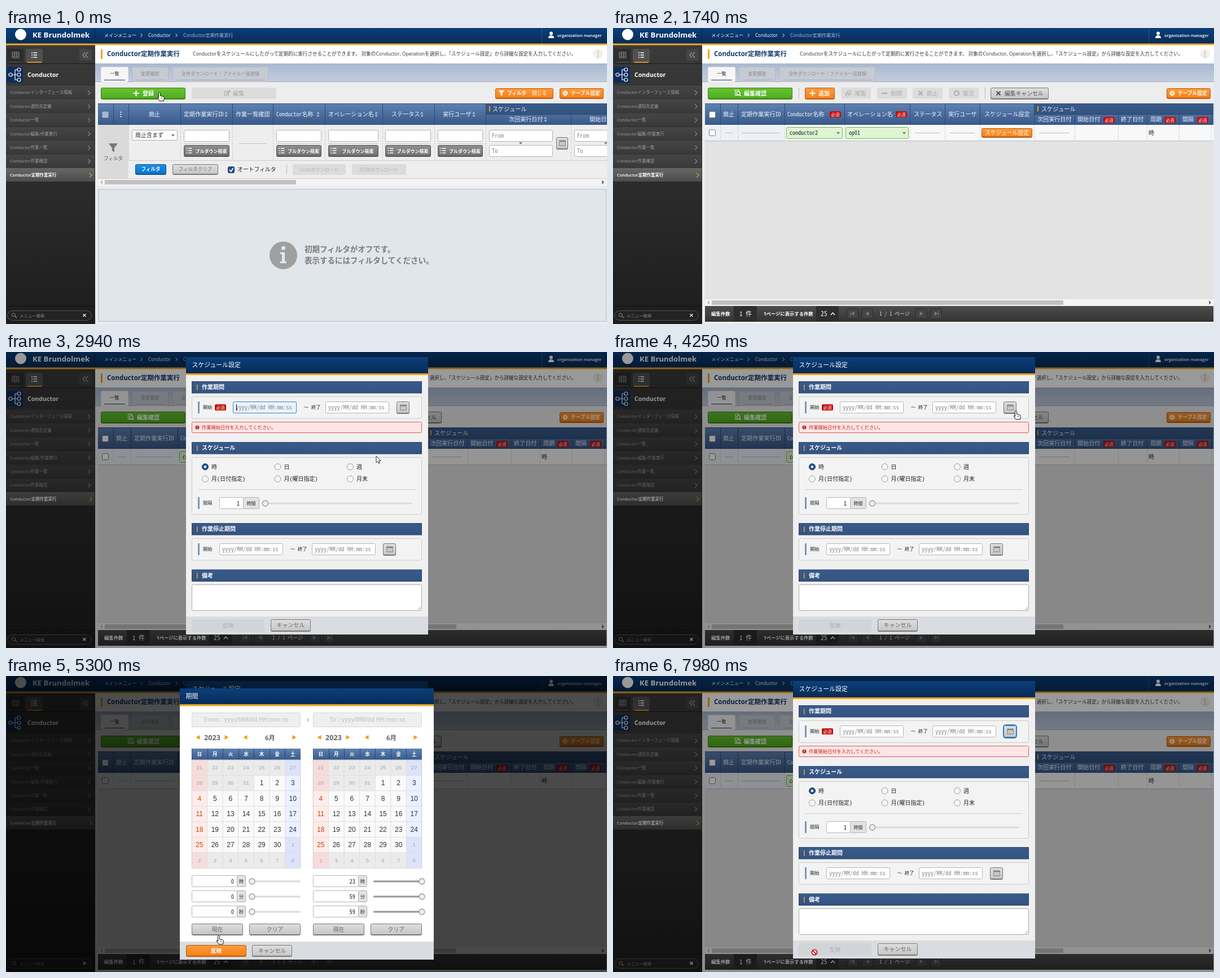
These frames come from a looping animation (1065 px wide and 526 px high, 8000 ms). An HTML page:

```html
<!DOCTYPE html>
<html lang="ja">
<head>
<meta charset="utf-8">
<title>Schedule settings</title>
<style>
html,body{margin:0;width:100%;height:100%;overflow:hidden;background:#ededed}
svg{display:block;width:100vw;height:100vh}
text{font-family:"Open Sans","Noto Sans CJK JP",sans-serif;white-space:pre}
.m{font-family:"Noto Sans Mono CJK JP","Noto Sans CJK JP",monospace}
.a{font-family:"Liberation Sans",Arial,sans-serif}
.b{font-weight:700}
.s{font-weight:600}
.c{text-anchor:middle}
.e{text-anchor:end}
#cursor{animation:move 8s ease-in-out infinite}
@keyframes move{
0%,16.25%{transform:translate(272px,114px)}
21.75%{transform:translate(675px,149px)}
26.4%,32.5%{transform:translate(690px,184px)}
36.75%,39.4%{transform:translate(656px,185px)}
46.5%,55.6%{transform:translate(714px,104px);animation-timing-function:ease-in}
62.1%{transform:translate(453px,341px);animation-timing-function:ease-out}
66.25%,73.75%{transform:translate(377px,461px)}
79.5%,86.25%{transform:translate(576px,457px)}
91.25%{transform:translate(430px,498px)}
94.6%,100%{transform:translate(357px,491px)}
}
</style>
</head>
<body>
<svg id="stage" viewBox="0 0 1065 526" preserveAspectRatio="none"></svg>
<script>
const LOOP = 8000;
let css = '', count = 0;

// Drawing helpers
const R = (x, y, w, h, fill, stroke, r = 0) => {
  const i = stroke ? .5 : 0;
  return `<rect x="${x + i}" y="${y + i}" width="${w - 2 * i}" height="${h - 2 * i}" rx="${r}" fill="${fill}" ${stroke ? `stroke="${stroke}"` : ''}/>`;
};
const C = (x, y, r, fill, stroke = 'none', w = 1) =>
  `<circle cx="${x}" cy="${y}" r="${r}" fill="${fill}" stroke="${stroke}" stroke-width="${w}"/>`;
const P = (d, stroke, w = 1, fill = 'none', extra = '') =>
  `<path d="${d}" stroke="${stroke}" stroke-width="${w}" fill="${fill}" ${extra}/>`;
const T = (x, y, s, size, fill, cls = '') =>
  `<text x="${x}" y="${y}" font-size="${size}" fill="${fill}" class="${cls}">${s}</text>`;
const each = (list, f) => list.map(f).join('');
const V = (x, y1, y2, color, dash) => P(`M${x + .5} ${y1}V${y2}`, color, 1, 'none', dash ? 'stroke-dasharray="2 2"' : '');
const H = (y, x1, x2, color) => P(`M${x1} ${y + .5}H${x2}`, color);

// Visible from a to b (ms), optionally fading in
const show = (a, b, html, fade = 0) => {
  const name = 'k' + count++, p = t => t / LOOP * 100;
  css += `@keyframes ${name}{` +
    (a ? `0%,${p(a) - .01}%{opacity:0}` : '0%{opacity:1}') +
    `${p(a + fade)}%,${p(b) - .01}%{opacity:1}` +
    (b < LOOP ? `${p(b)}%,100%{opacity:0}}` : '100%{opacity:1}}');
  return `<g style="animation:${name} 8s linear infinite">${html}</g>`;
};

const gradients = {
  nav: ['#0c3f7a', '#062b58'], th: ['#5f82b2', '#38598a'], band: ['#3a5a8b', '#33537f'],
  green: ['#66c335', '#4fae1c'], orange: ['#ff9c3c', '#f5801a'], gray: ['#dedede', '#c6c6c6'],
  dark: ['#8f8f8f', '#717171'], blue: ['#1c8fe6', '#0b74cc'], side: ['#3a3a3a', '#1d1d1d'],
  item: ['#454545', '#383838'], current: ['#666', '#4c4c4c'], foot: ['#4d4d4d', '#333'], tabs: ['#a9b8d0', '#c3cddd']
};
const defs = '<defs>' + each(Object.entries(gradients), ([id, [a, b]]) =>
  `<linearGradient id="${id}" x2="0" y2="1"><stop stop-color="${a}"/><stop offset="1" stop-color="${b}"/></linearGradient>`) + '</defs>';

const edges = { green: '#37800f', orange: '#b9590a', gray: '#777', dark: '#555', blue: '#07569b' };
const button = (x, y, w, h, kind) => kind === 'off'
  ? R(x, y, w, h, '#dcdcdc', 0, 2)
  : R(x, y + 1, w, h, edges[kind], 0, 3) + R(x, y, w, h, `url(#${kind})`, edges[kind], 2);
const label = (x, y, w, h, kind, s, size = 9.8, fill = '#666', cls = '') =>
  button(x, y, w, h, kind) + T(x + w / 2, y + h / 2 + size * .37, s, size, fill, 'c ' + cls);

// Icons
const chevron = (x, y, color, k = 3, w = 1.2) => P(`M${x - k / 2} ${y - k}l${k} ${k}l${-k} ${k}`, color, w);
const tri = (x, y, dx, color) => P(`M${x - dx} ${y - 4}v8l${2 * dx}-4z`, 'none', 0, color);
const down = (x, y, color = '#777') => P(`M${x - 3} ${y - 2}h6l-3 4z`, 'none', 0, color);
const plus = (x, y, color) => P(`M${x - 5} ${y}h10M${x} ${y - 5}v10`, color, 2.2);
const cross = (x, y, color, k = 3.5, w = 2) => P(`M${x - k} ${y - k}l${2 * k} ${2 * k}m0 ${-2 * k}l${-2 * k} ${2 * k}`, color, w);
const funnel = (x, y, k, color) => P(`M${x - k} ${y - k}h${2 * k}l${-.75 * k} ${k}v${k}l${-.5 * k}${-.4 * k}v${-.6 * k}z`, 'none', 0, color);
const gear = (x, y) => C(x, y, 2.5, 'none', '#fff', 1.8) + P(`M${x - 4} ${y}a4 4 0 1 1 0 .1`, '#fff', 1.6, 'none', 'stroke-dasharray="1.6 1.55"');
const sorter = (x, y) => P(`M${x - 2.5} ${y - 1}h5l-2.5-4zm0 2h5l-2.5 4z`, 'none', 0, '#a9bdd8');
const pages = (x, y, color) => R(x - 5, y - 1, 7, 6, 'none', color) + R(x - 2, y - 5, 7, 7, 'none', color);
const listIcon = (x, y, color) => P(`M${x - 5} ${y - 4}h2m1.5 0h6.5m-10 4h2m1.5 0h6.5m-10 4h2m1.5 0h6.5`, color, 1.5);
const calendarIcon = (x, y) => R(x - 5, y - 5, 11, 10, '#eee', '#777') + P(`M${x - 5} ${y - 3}h11`, '#777', 2) +
  P(`M${x - 4} ${y}h9m-9 2.5h9m-6-4v6m3-6v6`, '#999', .7);
const calendarButton = (x, y, w = 23, h = 21) => button(x, y, w, h, 'gray') + calendarIcon(x + w / 2, y + h / 2);
const badge = (x, y) => R(x, y, 20, 11, '#c40d0d', 0, 2) + T(x + 10, y + 8.5, '必須', 7.5, '#fff', 'c');
const input = (x, y, w, h = 21, s = '') => R(x, y, w, h, '#fff', '#b5b5b5', 2) + T(x + 5, y + 14.3, s, 10.5, '#888', 'm');
const knob = (x, y) => C(x, y, 5, '#eee', '#999', 1.3);
const rule = (x1, x2, y) => H(y, x1, x2, '#bbb');
const headers = list => each(list, ([x, s, y = 157]) => T(x, y, s, 10.1, '#f0f4fa', 'm'));
const scrollbar = (y, end) => R(163, y, 901, 12, '#f4f4f4') + R(175, y + 2, end - 175, 8, '#c1c1c1') +
  tri(169, y + 6, -1.5, '#aaa') + tri(1058, y + 6, 1.5, '#444');
const settings = button(981, 107, 78, 18, 'orange') + gear(991, 116) + T(1001, 119.3, 'テーブル設定', 8.7, '#fff', 'b');
const checkbox = (x, y) => R(x, y, 12, 12, '#fff', '#777', 2);

// Page frame
const menu = ['インターフェース情報', '通知先定義', '一覧', '編集/作業実行', '作業一覧', '作業確認', '定期作業実行'];
const frame = R(0, 0, 1065, 526, '#ededed') +
  R(0, 0, 1065, 28, 'url(#nav)') + V(157, 0, 27, '#0a2647') + V(949, 0, 27, '#2a5188') + R(0, 27.5, 1065, 3, '#f5a40e') +
  C(26, 11.5, 10, '#fff') + T(47, 17, 'KE Brundolmek', 13.2, '#fff', 'b') +
  T(174, 16, 'メインメニュー', 8.2, '#fff') + chevron(240, 13, '#8ea6c6') + T(252, 16, 'Conductor', 8.1, '#fff') +
  chevron(302, 13, '#8ea6c6') + T(314, 16, 'Conductor定期作業実行', 8.1, '#a9bbd4') +
  C(966, 9.5, 3, '#fff') + P('M961 18q0-5 5-5t5 5z', 'none', 0, '#fff') + T(977, 16, 'organization manager', 7.4, '#fff', 's') +
  R(0, 30.5, 158, 496, 'url(#side)') + R(2, 37, 29, 25, '#2d2d2d') + R(35, 37, 30, 25, '#505050', 0, 2) +
  P('M11 43h12v10h-12zm4 0v10m4-10v10m-8-7h12m-12 4h12', '#888') + H(60, 5, 28, '#555') +
  listIcon(50, 48, '#fff') + R(38, 60, 25, 1.5, '#f5a40e') + R(130, 37, 22, 21, '#444', 0, 2) +
  P('M140 43l-4 5 4 5m5-10l-4 5 4 5', '#aaa', 1.2) + H(63, 0, 158, '#1a1a1a') +
  R(2, 69, 28, 28, '#0c2c5c') + P('M9 83h10m-3-9h4m-4 0v18h4', '#fff', 1.2) +
  each([[8, 83], [23, 74], [23, 83], [23, 92]], ([x, y]) => C(x, y, 3, '#0c2c5c', '#fff', 1.2)) +
  T(38, 86.5, 'Conductor', 10.6, '#fff', 'b') +
  each(menu, (s, i) => {
    const y = 102.5 + i * 24.4, on = i === 6;
    return R(0, y, 157, 24.4, `url(#${on ? 'current' : 'item'})`) + H(Math.round(y + 24), 0, 157, '#262626') +
      T(7, y + 14.8, 'Conductor' + s, 7.45, on ? '#fff' : '#a0a0a0', on ? 's' : '') + chevron(on ? 150 : 147, y + 12.5, on ? '#f5a40e' : '#888', 4);
  }) +
  H(494, 0, 158, '#111') + R(2, 502, 150, 18, '#222', '#555', 9) + C(13.5, 510, 3, 'none', '#888') + P('M16 512l3 3', '#888', 1.4) +
  T(24, 514, 'メニュー検索', 7.4, '#888') + cross(139, 510.5, '#ddd', 2.5, 1.5) +
  R(158, 30.5, 907, 32.5, '#fff') + R(168, 38, 3, 17, '#f5a40e') + T(179, 50.3, 'Conductor定期作業実行', 11.5, '#12386b', 'b') +
  T(331, 49.3, 'Conductorをスケジュールにしたがって定期的に実行させることができます。 対象のConductor, Operationを選択し、「スケジュール設定」から詳細な設定を入力してください。', 8.55, '#333') +
  C(1049, 46, 9, '#f1f1f1') + each([42, 46, 50], y => C(1049, y, 1.1, '#f08a1c')) +
  R(158, 63, 907, 32, 'url(#tabs)') + H(95, 158, 1065, '#9daabd') +
  each([[168, 49, '一覧', 1], [223, 65, '変更履歴'], [295, 170, '全件ダウンロード・ファイル一括登録']], ([x, w, s, on]) =>
    R(x, 69, w, 27, on ? '#f6f6f6' : '#c6cbd3', on ? '#e8e8e8' : '#b4bbc7', 2) +
    T(x + w / 2, 84, s, 8.15, on ? '#222' : '#868a91', 'c') + H(92, x + 6, x + w - 6, on ? '#12386b' : '#a6abb3'));

// List view
const fields = [[315, 81], [479, 80], [571, 89], [672, 81], [765, 80]];
const dateFilter = x => input(x, 181, 113, 21, 'From') + input(x, 208, 113, 21, 'To') + down(x + 56, 205);
const list = button(168, 106, 150, 20, 'green') + plus(230.5, 116, '#fff') + T(242, 119.8, '登録', 10.1, '#fff', 'b') +
  button(329, 106, 150, 20, 'off') + R(387, 112, 8, 9, 'none', '#aaa') + P('M390 118l7-7', '#aaa', 2) + T(402, 119.8, '編集', 10.1, '#aaa') +
  button(867, 107, 103, 18, 'orange') + funnel(878, 116, 5, '#fff') + T(888, 119.3, 'フィルタ', 8.6, '#fff', 'b') + T(932, 119.3, '閉じる', 8.8, '#fff') + settings +
  R(163, 134, 902, 38, 'url(#th)') + R(851, 134, 214, 19, 'url(#band)') + H(153, 851, 1065, '#29466f') + H(134, 163, 1065, '#2f4d79') + H(171, 163, 1065, '#29466f') +
  each([190, 217, 309, 401, 473, 565, 667, 759, 850], x => V(x, 134, 172, '#2b4a77')) + V(1001, 153, 172, '#2b4a77') +
  R(170, 148, 12, 12, '#a9b8cd', '#8496b1', 2) + each([149.5, 153.5, 157.5], y => C(203.5, y, 1.1, '#fff')) +
  headers([[253, '廃止'], [315, '定期作業実行ID'], [407, '作業一覧確認'], [479, 'Conductor名称'], [571, 'オペレーション名'], [683, 'ステータス'], [774, '実行ユーザ'],
    [862, 'スケジュール', 147.5], [891, '次回実行日付', 166], [1034, '開始日付', 166]]) +
  R(856, 139, 2, 9, '#f5a40e') + each([390, 553, 656, 737, 829], x => sorter(x, 153.5)) + sorter(956, 162.5) +
  R(163, 172, 902, 95, '#eee') + R(163, 172, 54, 95, '#dadada') + H(235, 217, 1065, '#ccc') + H(267, 163, 1065, '#ccc') +
  each([217, 309, 401, 473, 565, 667, 759, 850, 1001], x => V(x, 172, 235, '#c2c2c2', 1)) +
  funnel(190, 213, 8, '#777') + T(190, 235, 'フィルタ', 8.6, '#555', 'c') +
  R(223, 181, 81, 19, '#fff', '#aaa', 2) + T(229, 194.3, '廃止含まず', 10, '#333') + down(296, 191) +
  each(fields, ([x, w]) => input(x, 181, w) + P(`M${x} 205.5h${w}`, '#bbb', 1, 'none', 'stroke-dasharray="2 1"') + button(x, 208, w, 20, 'dark') +
    listIcon(x + 9.5, 218, '#fff') + T(x + 20 + (w - 80) / 2, 221.5, 'プルダウン検索', 8, '#fff', 'b')) +
  rule(413, 462, 205) + dateFilter(856) + calendarButton(975, 194, 21, 21) + dateFilter(1007) +
  label(229, 242, 55, 18, 'blue', 'フィルタ', 8.6, '#fff', 'b') + label(295, 242, 81, 18, 'gray', 'フィルタクリア', 8.6, '#777') +
  R(393, 246, 12, 12, '#27508a', '#1d3c69', 2) + P('M396 252l2.5 3 4-6', '#fff', 1.8) + T(410, 255.3, 'オートフィルタ', 9.85, '#222') + V(497, 242, 261, '#bbb') +
  label(508, 242, 94, 19, 'off', 'Excelダウンロード', 8.2, '#b0b0b0') + label(613, 242, 96, 19, 'off', 'JSONダウンロード', 8.2, '#b0b0b0') +
  scrollbar(268, 514) + R(163, 286, 901, 236, '#e1e6eb', '#bfc8d3') + R(164, 287, 899, 234, 'none', '#d5dce4') +
  C(491.5, 404, 24.5, '#9f9f9f') + C(491.5, 391, 3.5, '#e4e8ec') + P('M486 398.500h8v16h3v3.500h-11v-3.500h3v-12.500h-3z', 'none', 0, '#e4e8ec') +
  T(529, 397.5, '初期フィルタがオフです。', 13.5, '#7b7b7b', 'b') + T(529, 417.5, '表示するにはフィルタしてください。', 13.5, '#7b7b7b', 'b');

// Edit view
const select = (x, w, s) => R(x, 176, w, 21, '#dff4d3', '#70b848', 2) + T(x + 6, 190, s, 10, '#222', 'm') + down(x + w - 8, 187);
const pager = (x, d, bar) => R(x, 498, 21, 19, '#444', '#2b2b2b', 2) + tri(x + 10.5, 507.5, 3 * d, '#777') + (bar ? V(x + 10 + 4 * d, 503, 512, '#777') : '');
const tool = (x, s) => button(x, 106, 53, 20, 'off') + T(x + 24.5, 119.8, s, 10, '#aaa');
const edit = button(168, 106, 150, 20, 'green') + R(216, 110, 8, 10, 'none', '#fff') + C(222, 116, 3, '#58b526', '#fff', 1.3) + P('M224 118l3 3', '#fff', 1.6) +
  T(232, 119.8, '編集確認', 10, '#fff', 'b') + V(329, 106, 126, '#bbb') + V(659, 106, 126, '#bbb') +
  button(340, 106, 53, 20, 'orange') + plus(353.5, 116, '#fff') + T(364, 119.8, '追加', 10, '#fff', 'b') +
  tool(404, '複製') + tool(468, '削除') + tool(531, '廃止') + tool(595, '復活') +
  pages(417, 116, '#aaa') + P('M476 116h10', '#aaa', 2) + cross(545, 116, '#aaa') + C(609, 116, 4, 'none', '#aaa', 2) +
  button(669, 106, 103, 20, 'gray') + cross(683, 116, '#555') + T(694, 119.8, '編集キャンセル', 9.85, '#555') + settings +
  R(163, 134, 901, 348, '#e3e3e3') + R(163, 134, 901, 38, 'url(#th)') + R(746, 134, 318, 19, 'url(#band)') +
  H(134, 163, 1064, '#2f4d79') + H(153, 746, 1064, '#29466f') + H(171, 163, 1064, '#29466f') +
  each([190, 221, 304, 410, 526, 588, 650, 746], x => V(x, 134, 172, '#2b4a77')) + each([818, 895, 946, 1003, 1060], x => V(x, 153, 172, '#2b4a77')) +
  headers([[195, '廃止'], [227, '定期作業実行ID'], [309, 'Conductor名称'], [415, 'オペレーション名'], [533, 'ステータス'], [594, '実行ユーザ'], [658, 'スケジュール設定'],
    [759, 'スケジュール', 147.5], [752, '次回実行日付', 166], [823, '開始日付', 166], [900, '終了日付', 166], [952, '周期', 166], [1009, '間隔', 166]]) +
  R(752, 139, 2, 9, '#f5a40e') + badge(384, 148) + badge(501, 148) + badge(869, 158) + badge(977, 158) + badge(1035, 158) +
  R(163, 172, 901, 28, '#f8f8f8') + R(163, 172, 141, 28, '#edf1f7') + H(200, 163, 1064, '#a9c0de') +
  each([190, 221, 304, 410, 526, 588, 650, 746, 818, 895, 946, 1003, 1060], x => V(x, 172, 200, '#c2c2c2', 1)) +
  checkbox(170, 148) + checkbox(170, 180) +
  each([[199, 213], [229, 296], [535, 580], [597, 641], [755, 809]], ([a, b]) => rule(a, b, 186)) +
  select(307, 100, 'conductor2') + select(412, 112, 'op01') + label(653, 178, 90, 16, 'orange', 'スケジュール設定', 9.9, '#fff') + T(949, 190, '時', 10, '#222') +
  scrollbar(482, 798) + R(163, 494, 901, 28, 'url(#foot)') + R(214, 494, 41, 28, '#2e2e2e') + R(360, 494, 40, 28, '#2e2e2e') +
  T(174, 510.8, '編集件数', 8.4, '#fff', 'b') + T(224, 511.5, '1 件', 11, '#fff', 'm') + T(267, 510.8, '1ページに表示する件数', 8.3, '#fff', 'b') +
  T(368, 511.5, '25', 11.5, '#fff', 'm') + P('M386 510l3.500-4 3.500 4', '#fff', 1.4) +
  pager(414, -1, 1) + pager(440, -1) + pager(536, 1) + pager(562, 1, 1) + T(472, 511, '1 / 1 ページ', 9, '#ddd', 'm');

// Dialogs
const dialog = (x, y, w, bottom, head, foot, title, bg) => R(x, y, w, bottom - y, bg) + R(x, y, w, head, 'url(#nav)') + R(x, y + head, w, 3, '#f5a40e') +
  T(x + 10.5, y + 18, title, 10.9, '#fff') + R(x, foot, w, bottom - foot, '#d9dde1');
const shade = opacity => `<rect width="1065" height="526" opacity="${opacity}"/>`;
const section = (y, s) => R(329, y, 408, 21.5, 'url(#band)', '#29466f') + R(338, y + 6, 1.5, 10, '#f5a40e') + T(347, y + 14.3, s, 10, '#fff', 'b');
const panel = (y, h, mark) => R(329, y, 408, h, '#f3f3f3', '#ccc', 2) + R(340, mark, 3, 21, '#7f95b5');
const small = (x, y, s) => T(x, y, s, 8.3, '#222');
const hint = 'yyyy/MM/dd HH:mm:ss';
const period = (x, y, gap) => input(x, y, 113, 21, hint) + T(x + gap, y + 13, '〜', 8.5, '#222', 'c') + small(x + gap + 9, y + 13, '終了') +
  input(x + 164, y, 113, 21, hint) + calendarButton(x + 290, y);
const modes = ['時', '日', '週', '月(日付指定)', '月(曜日指定)', '月末'];
const schedule = dialog(319, 9, 429, 502, 29, 470, 'スケジュール設定', '#f0f0f0') +
  section(52, '作業期間') + panel(79, 39.5, 88) + small(349, 101, '開始') + badge(370, 93) + period(402, 88, 130) +
  R(329, 124, 408, 20, '#ffe5e5', '#dc5b5b', 2) + C(339, 134, 3.6, '#c2221c') + P('M339 131.800v2.700m0 .8v1', '#fff', 1.1) + T(347, 137.2, '作業開始日付を入力してください。', 8.25, '#c2221c') +
  section(160, 'スケジュール') + panel(187, 102, 258) +
  each(modes, (s, i) => {
    const x = 353 + i % 3 * 128.5, y = 204 + (i > 2) * 21.5;
    return C(x, y, 5.5, i ? '#f6f6f6' : '#27508a', i ? '#999' : '#1d3c69') + (i ? '' : C(x, y, 2.2, '#fff')) + T(x + 11, y + 3.7, s, 10, '#222', 'm');
  }) +
  H(244, 341, 726, '#ccc') + small(349, 271, '間隔') + input(378, 258, 43) + T(414, 272.5, '1', 10.5, '#222', 'm e') +
  R(420, 258, 29, 21, '#e2e2e2', '#b5b5b5', 2) + T(434.5, 271.7, '時間', 8, '#222', 'c') + R(460, 267.5, 260, 3, '#dadada', 0, 1.5) + knob(459.5, 269) +
  section(304, '作業停止期間') + panel(331, 39.5, 340) + small(349, 353, '開始') + period(378, 340, 130) +
  section(386.5, '備考') + R(329, 413, 408, 47, '#fff', '#aaa', 2) + P('M730 458l5-5m-2 5l2-2', '#777', .8) +
  R(329, 475, 129, 22, '#d1d5d9', 0, 2) + T(393.5, 490, '反映', 10, '#a9adb1', 'c') + label(469, 475, 71, 21, 'gray', 'キャンセル', 10) +
  show(2650, 4120, R(402, 88, 113, 21, '#e9f3fc', '#2f86d6', 2) + T(407, 102.3, hint, 10.5, '#888', 'm') + show(2650, 3250, V(408, 93, 104, '#000'))) +
  show(7850, LOOP, R(691, 86, 25, 25, 'none', '#1a7fe0', 4) + R(692, 87, 23, 23, 'none', '#1a7fe0', 3));

const dayCell = (x, i, selected, isOff) => {
  const n = i - 10, out = n < 1 || n > 30, col = i % 7, off = isOff(n);
  const cx = x + col * 27.57, cy = 149 + Math.floor(i / 7) * 27.5;
  const bg = off ? '#fff' : col === 0 ? (out ? '#f7dcdc' : '#fdecea') : col === 6 ? (out ? '#dde3fb' : '#edf0fe') : out ? '#ebebeb' : '#fafafa';
  const ink = off ? (out ? '#999' : '#d9d9d9') : out ? '#a5a5a5' : col === 0 ? '#c4480c' : col === 6 ? '#1c3263' : '#333';
  const hit = n === selected, size = out || off ? 9.8 : 12;
  return `<rect x="${cx}" y="${cy}" width="27.57" height="27.5" fill="${bg}" stroke="#ddd" stroke-width=".8"/>` +
    (hit ? C(cx + 13.8, cy + 13.2, 10.8, '#fbb02d') : '') +
    T(cx + 13.8, cy + 13.2 + size * .36, n < 1 ? n + 31 : out ? n - 30 : n, size, hit ? '#fff' : ink, 'a c');
};
const half = (x, text, filled, times, selected, isOff) => R(x, 65, 193, 26, '#efefef', '#d8d8d8', 2) +
  `<g letter-spacing="${filled ? .25 : 0}">${T(x + 96.5, filled ? 81.5 : 81, text, filled ? 11.4 : 10.4, filled ? '#333' : '#ccc', 'a b c')}</g>` +
  each([[11, -3.5], [62, 3.5], [95, -3.5], [182, 3.5]], ([dx, d]) => tri(x + dx, 109, d, '#f59a0e')) +
  T(x + 36.5, 113.5, '2023', 12.6, '#666', 'b c') + T(x + 139, 113.5, '6月', 11.4, '#666', 'b c') +
  R(x, 129, 193, 20, 'url(#th)') + each([...'日月火水木金土'], (s, i) => T(x + 13.8 + i * 27.57, 142.3, s, 8.6, '#fff', 's c') + V(Math.round(x + i * 27.57), 129, 149, '#2b4a77')) +
  each([...Array(49).keys()], i => dayCell(x, i, selected, isOff)) + R(x, 149, 193, 193, 'none', '#d5d5d5') +
  each(times, (v, i) => {
    const y = 365 + i * 27, k = x + 107 + 86 * v / (i ? 59 : 23);
    return input(x, y - 11, 81) + T(x + 75, y + 4, v, 10.5, '#222', 'm e') + R(x + 80, y - 11, 16, 21, '#e2e2e2', '#aaa', 2) +
      T(x + 88, y + 3.3, '時分秒'[i], 8.3, '#222', 'c') + R(x + 107, y - 1.5, 86, 3, '#dadada', 0, 1.5) + R(x + 107, y - 1.5, k - x - 107, 3, '#999', 0, 1.5) + knob(k, y);
  }) +
  label(x, 440, 91, 20, 'gray', '現在', 10) + label(x + 102, 440, 91, 20, 'gray', 'クリア', 10);
const none = () => false, before = n => n < 23, after = n => n > 23;
const [from, to] = [30, 31].map(s => '2023/06/23 15:39:' + s);
const left = (a, b, ...args) => show(a, b, half(329, ...args)), right = (a, b, ...args) => show(a, b, half(544, ...args));
const pressed = (t, x) => show(t, t + 125, R(x, 440, 91, 22, '#fff') + R(x, 441, 91, 21, '#dcdcdc', '#999', 2) + T(x + 45.5, 455.5, '現在', 10, '#888', 'c'));
const calendar = dialog(308, 22, 450, 504, 28.5, 472, '期間', '#fff') + chevron(535, 78, '#aaa') +
  left(0, 5900, 'From : ' + hint, 0, [0, 0, 0], null, none) + left(5900, 6920, from, 1, [15, 39, 30], 23, none) + left(6920, LOOP, from, 1, [15, 39, 30], 23, after) +
  right(0, 5900, 'To : ' + hint, 0, [23, 59, 59], null, none) + right(5900, 6920, 'To : ' + hint, 0, [23, 59, 59], null, before) + right(6920, LOOP, to, 1, [15, 39, 31], 23, before) +
  pressed(5710, 329) + pressed(6795, 544) +
  label(319, 478, 107, 20, 'orange', '反映', 9.8, '#fff', 'b') + label(436, 478, 71, 20, 'gray', 'キャンセル', 9.8);

// Pointer
const arrow = P('M0 0v11.500l2.700-2.500 1.800 4 2-.9-1.800-3.900h3.700z', '#222', .9, '#fff');
const hand = P('M-1.500 1.500q1.500-2.600 3 0v5l5 1.200q2 .6 1.800 2.500l-.9 5.500h-7.400l-4-6q.6-1.600 2.200-.2l.3 1z', '#111', 1, '#fff', 'stroke-linejoin="round"') + P('M3 9v3m2-2.500v2.500', '#555', .7);
const beam = P('M-2-4.500h1.500l.5.500.5-.5h1.500m-2 .5v8m-2 .5h1.500l.5-.5.5.5h1.500', '#777', .9);
const ban = C(0, 0, 4.6, '#fff', '#c4141c', 1.8) + P('M-3-3l6 6', '#c4141c', 1.8);
const shapes = [[0, hand], [1350, arrow], [1690, beam], [1800, arrow], [2000, hand], [2650, arrow], [3620, hand], [4500, arrow],
  [5200, hand], [5960, arrow], [6250, hand], [6960, arrow], [7450, hand], [7860, ban]];
const pointer = '<g id="cursor">' +
  each([480, 2330, 4120, 5710, 6795], t => show(t, t + 125, `<circle cx="1" cy="-.5" r="7.5" fill="#f7ea1c" opacity=".8"/>`)) +
  each(shapes, ([t, shape], i) => show(t, i + 1 < shapes.length ? shapes[i + 1][0] : LOOP, shape)) + '</g>';

document.getElementById('stage').innerHTML = defs + frame + show(0, 800, list) + show(1390, LOOP, edit) +
  show(2500, LOOP, shade(.4) + schedule, 150) + show(4400, 7850, shade(.5) + calendar, 150) + pointer;
document.head.appendChild(document.createElement('style')).textContent = css;
</script>
</body>
</html>
```
